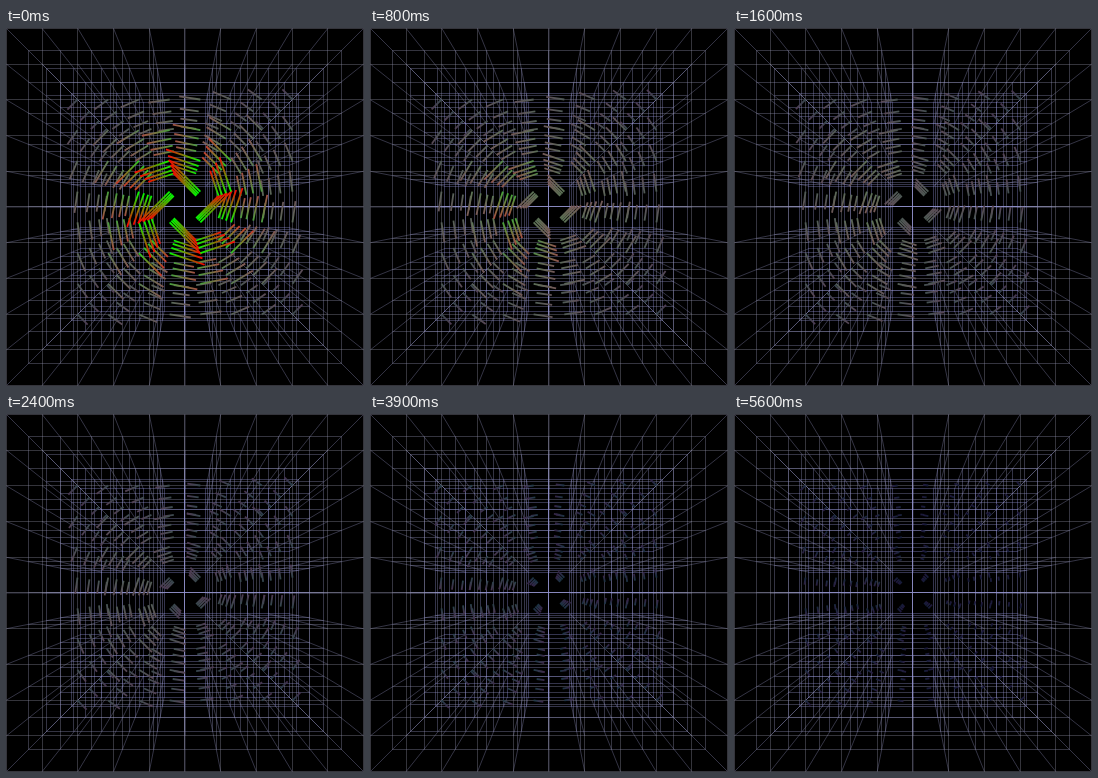
Animation of 358x358 px, one loop 5700 ms. Source, as an HTML page with a canvas:

```html
<!DOCTYPE html>
<html lang="en">
<head>
<meta charset="utf-8">
<title>Decaying vortex</title>
<style>
html, body { margin: 0; width: 100%; height: 100%; overflow: hidden; background: #000; }
canvas { display: block; width: 358px; height: 358px; }
</style>
</head>
<body>
<canvas id="stage" width="358" height="358"></canvas>
<script>
const SIZE = 358, CENTER = 178.99, CELL = 35.7, EYE = 7;
const LOOP = 5700, STEP = 100;
const ctx = document.getElementById('stage').getContext('2d');

// Screen scale at a depth measured in cells behind the front plane.
const scaleAt = depth => 1 / (1 + depth / EYE);
const clamp = (v, lo, hi) => Math.min(hi, Math.max(lo, v));

function drawGrid() {
  const layer = document.createElement('canvas');
  layer.width = layer.height = SIZE;
  const g = layer.getContext('2d');
  const at = (i, depth) => CENTER + i * CELL * scaleAt(depth);
  const snapped = (i, depth) => Math.floor(at(i, depth)) + 0.5;
  const line = (x1, y1, x2, y2) => {
    g.beginPath();
    g.moveTo(x1, y1);
    g.lineTo(x2, y2);
    g.stroke();
  };
  g.fillRect(0, 0, SIZE, SIZE);
  g.lineWidth = 0.9;
  g.strokeStyle = 'rgba(145,145,190,0.4)';
  for (let i = -5; i <= 5; i++)
    for (let j = -5; j <= 5; j++)
      line(at(i, 0), at(j, 0), at(i, 5), at(j, 5));

  // Bluer towards the back, so that stacked lines end up blue.
  g.lineWidth = 1;
  for (let depth = 0; depth <= 5; depth++) {
    const lo = snapped(-5, depth), hi = snapped(5, depth);
    g.strokeStyle = `rgba(145,145,${165 + 10 * depth},0.36)`;
    for (let i = -5; i <= 5; i++) {
      const p = snapped(i, depth);
      line(p, lo, p, hi);
      line(lo, p, hi, p);
    }
  }
  return layer;
}

// Arrow length, tail colour, tip colour.
const PALETTE = [
  [0, [14, 14, 40], [14, 14, 40]],
  [4, [20, 26, 56], [28, 22, 58]],
  [8, [28, 58, 70], [60, 38, 74]],
  [12, [58, 74, 78], [82, 62, 84]],
  [17, [88, 98, 88], [100, 86, 88]],
  [21, [92, 120, 86], [126, 90, 86]],
  [26, [55, 190, 42], [195, 68, 52]],
  [31, [0, 255, 0], [255, 0, 0]],
  [99, [0, 255, 0], [255, 0, 0]]
];

function arrowColors(length) {
  const k = PALETTE.findIndex(stop => stop[0] > length);
  const a = PALETTE[k - 1], b = PALETTE[k];
  const u = (length - a[0]) / (b[0] - a[0]);
  const mix = end => `rgb(${a[end].map((v, c) => Math.round(v + (b[end][c] - v) * u))})`;
  return [mix(1), mix(2)];
}

// The core fades first; the left side keeps its speed longest.
function arrowLength(x, r, t) {
  const start = 50 * Math.exp(-r / 90);
  const slow = r > 25 ? clamp(0.2 - 1.2 * x / r, 0, 1) : 0;
  const limit = (24 * Math.exp(-0.32 * t) + 2 / (t + 0.05)) * (1 + 0.4 * slow);
  return start / Math.cbrt(1 + Math.pow(start / limit, 3));
}

const MID = scaleAt(2.5);
const SPACING = 17.55 * MID;
const arrows = [];
for (let depth = 4; depth >= 1; depth--)
  for (let i = -7; i <= 7; i += 2)
    for (let j = -7; j <= 7; j += 2) {
      const x = i * SPACING, y = j * SPACING;
      arrows.push({ x, y, r: Math.hypot(x, y), s: scaleAt(depth) / MID });
    }

function drawArrow({ x, y, r, s }, t) {
  const length = arrowLength(x, r, t);
  const x1 = CENTER + x * s, y1 = CENTER + y * s;
  const x2 = x1 + y / r * length * s, y2 = y1 - x / r * length * s;
  const [tail, tip] = arrowColors(length);
  const paint = ctx.createLinearGradient(x1, y1, x2, y2);
  paint.addColorStop(0, tail);
  paint.addColorStop(1, tip);
  ctx.strokeStyle = paint;
  ctx.beginPath();
  ctx.moveTo(x1, y1);
  ctx.lineTo(x2, y2);
  ctx.stroke();
}

const grid = drawGrid();

function frame() {
  let step = Math.floor(performance.now() % LOOP / STEP);
  if (step === 31) step = 30; // one pose is held twice as long
  ctx.drawImage(grid, 0, 0);
  ctx.lineWidth = 1.8;
  for (const arrow of arrows) drawArrow(arrow, step * STEP / 1000);
  requestAnimationFrame(frame);
}
frame();
</script>
</body>
</html>
```
